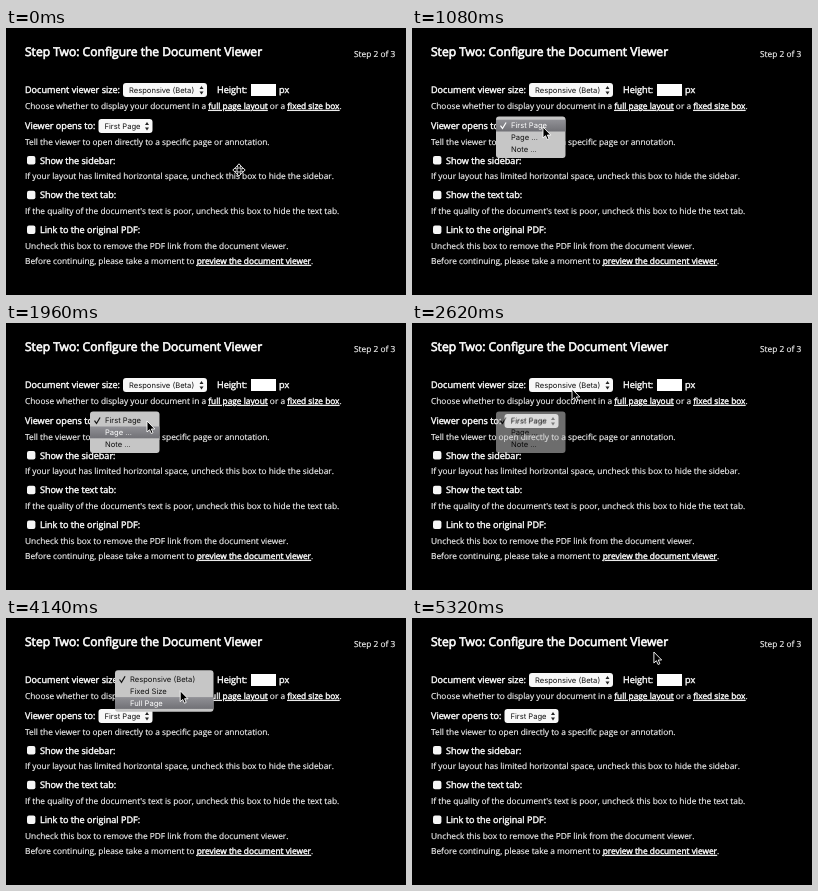
Recreate the animation shown at these times as an HTML page. Size 400 px wide and 267 px high, loop 5340 ms.

```html
<!DOCTYPE html>
<html lang="en">
<head>
<meta charset="utf-8">
<title>Configure the Document Viewer</title>
<style>
html, body { margin: 0; width: 100%; height: 100%; overflow: hidden; background: #000; }
svg { display: block; width: 400px; height: 267px; }
text { font: 8.33px "Open Sans", "Noto Sans", sans-serif; fill: #f4f4f4; stroke: #f4f4f4; stroke-width: .17px; white-space: pre; text-rendering: geometricPrecision; }
.title { font-size: 12.07px; fill: #fff; stroke: #fff; stroke-width: .65px; }
.label { font-size: 9.08px; fill: #fff; stroke: #fff; stroke-width: .4px; }
.link { fill: #fff; stroke: #fff; stroke-width: .4px; text-decoration: underline; }
.control text { font: 7.6px Inter, "Liberation Sans", sans-serif; fill: #111; stroke: none; }
.control .on { fill: #fff; }
</style>
</head>
<body>
<svg viewBox="0 0 400 267">
  <defs>
    <linearGradient id="hover" x2="0" y2="1"><stop stop-color="#919196"/><stop offset="1" stop-color="#717176"/></linearGradient>
  </defs>
  <g id="page"></g>
  <g id="menus"></g>
  <path id="move" fill="#000" stroke="#fff" stroke-width=".9" d="M0-6.2L2.6-3.3H1V-1H3.3V-2.6L6.2 0L3.3 2.6V1H1V3.3H2.6L0 6.2L-2.6 3.3H-1V1H-3.3V2.6L-6.2 0L-3.3-2.6V-1H-1V-3.3H-2.6Z"/>
  <path id="arrow" fill="#000" stroke="#fff" stroke-width=".9" d="M0 0V11L2.5 8.7L4.2 12.5L6 11.7L4.4 8H7.8Z"/>
</svg>
<script>
const LOOP = 5340, LEFT = 19, ROW = 11.8, PAD = 3.2, LAG = 200;
const $ = id => document.getElementById(id);
const text = (x, y, s, cls = '') => `<text x="${x}" y="${y}" class="${cls}">${s}</text>`;
const link = s => `<tspan class="link">${s}</tspan>`;
const box = (x, y, w, h, r, fill) =>
  `<rect x="${x}" y="${y}" width="${w}" height="${h}" rx="${r}" fill="${fill}"/>`;
const select = (x, y, w, s) => `<g class="control">${box(x, y, w, 14, 3, '#f8f8f8')}
  ${text(x + 6, y + 9.8, s)}
  <path d="M${x + w - 7.5} ${y + 6}l2-3l2 3zm0 2.4l2 3l2-3z" fill="#222"/></g>`;

const options = [
  ['Show the sidebar:', 'If your layout has limited horizontal space, uncheck this box to hide the sidebar.'],
  ['Show the text tab:', 'If the quality of the document\'s text is poor, uncheck this box to hide the text tab.'],
  ['Link to the original PDF:', 'Uncheck this box to remove the PDF link from the document viewer.']
];
const option = ([name, hint], i) => {
  const y = 135.5 + 34.8 * i;
  return box(21, y - 7.5, 8.4, 8.4, 2, '#f6f6f6') + text(34, y, name, 'label') + text(LEFT, y + 15.8, hint);
};

$('page').innerHTML = [
  text(LEFT, 28.4, 'Step Two: Configure the Document Viewer', 'title'),
  text(348, 28.8, 'Step 2 of 3'),
  text(LEFT, 65, 'Document viewer size:', 'label'),
  select(117, 55, 84, 'Responsive (Beta)'),
  text(211, 65, 'Height:', 'label'),
  box(245, 56, 25, 12, 0, '#fff'),
  text(273, 65, 'px', 'label'),
  text(LEFT, 81, `Choose whether to display your document in a ${link('full page layout')} or a ${link('fixed size box')}.`),
  text(LEFT, 101, 'Viewer opens to:', 'label'),
  select(92.5, 91, 54, 'First Page'),
  text(LEFT, 117, 'Tell the viewer to open directly to a specific page or annotation.'),
  ...options.map(option),
  text(LEFT, 236, `Before continuing, please take a moment to ${link('preview the document viewer')}.`)
].join('');

const menus = [
  { x: 84, y: 88.5, w: 69.5, open: 900, fade: 2540, items: ['First Page', 'Page ...', 'Note ...'] },
  { x: 109, y: 52.3, w: 98.5, open: 2960, fade: 4900, items: ['Responsive (Beta)', 'Fixed Size', 'Full Page'] }
];

// cursor stops: time, x, y
const path = [
  [0, 233, 142], [200, 233, 142], [760, 125, 98], [1080, 131, 99], [1400, 128, 121],
  [1960, 141, 98], [2340, 160, 66], [2620, 160, 66], [3460, 162, 76],
  [3800, 161, 87], [4800, 210, 34], [LOOP, 242, 34]
];

function cursorAt(t) {
  const i = path.findIndex(p => p[0] > t);
  const [t0, x0, y0] = path[i - 1], [t1, x1, y1] = path[i];
  const u = (t - t0) / (t1 - t0), k = u * u * (3 - 2 * u);
  return [x0 + (x1 - x0) * k, y0 + (y1 - y0) * k];
}

// The highlight follows the cursor with a short lag.
function drawMenu({ x, y, w, open, fade, items }, t) {
  const alpha = Math.min(1, 1 - (t - fade) / 180);
  if (t < open || alpha <= 0) return '';
  const [cx, cy] = cursorAt(t - LAG);
  const row = cx < x + w ? Math.floor((cy - y - PAD) / ROW) : -1;
  const rows = items.map((s, i) => {
    const top = y + PAD + ROW * i, on = i === row;
    return (on ? box(x, top, w, ROW, 0, 'url(#hover)') : '') + text(x + 15, top + 8.7, s, on ? 'on' : '');
  }).join('');
  const tick = `<path d="M${x + 4.5} ${y + 9.2}l2 2.8l3.6-6" fill="none" stroke="${row ? '#111' : '#fff'}" stroke-width="1.2"/>`;
  return `<g class="control" opacity="${alpha}">${box(x, y, w, 41.5, 3, '#c6c6c6')}${rows}${tick}</g>`;
}

const start = performance.now();
function frame() {
  const t = (performance.now() - start) % LOOP;
  const moving = t < 220;
  $('menus').innerHTML = menus.map(m => drawMenu(m, t)).join('');
  $('move').style.display = moving ? '' : 'none';
  $('arrow').style.display = moving ? 'none' : '';
  $(moving ? 'move' : 'arrow').setAttribute('transform', `translate(${cursorAt(t)})`);
  requestAnimationFrame(frame);
}
frame();
</script>
</body>
</html>
```
